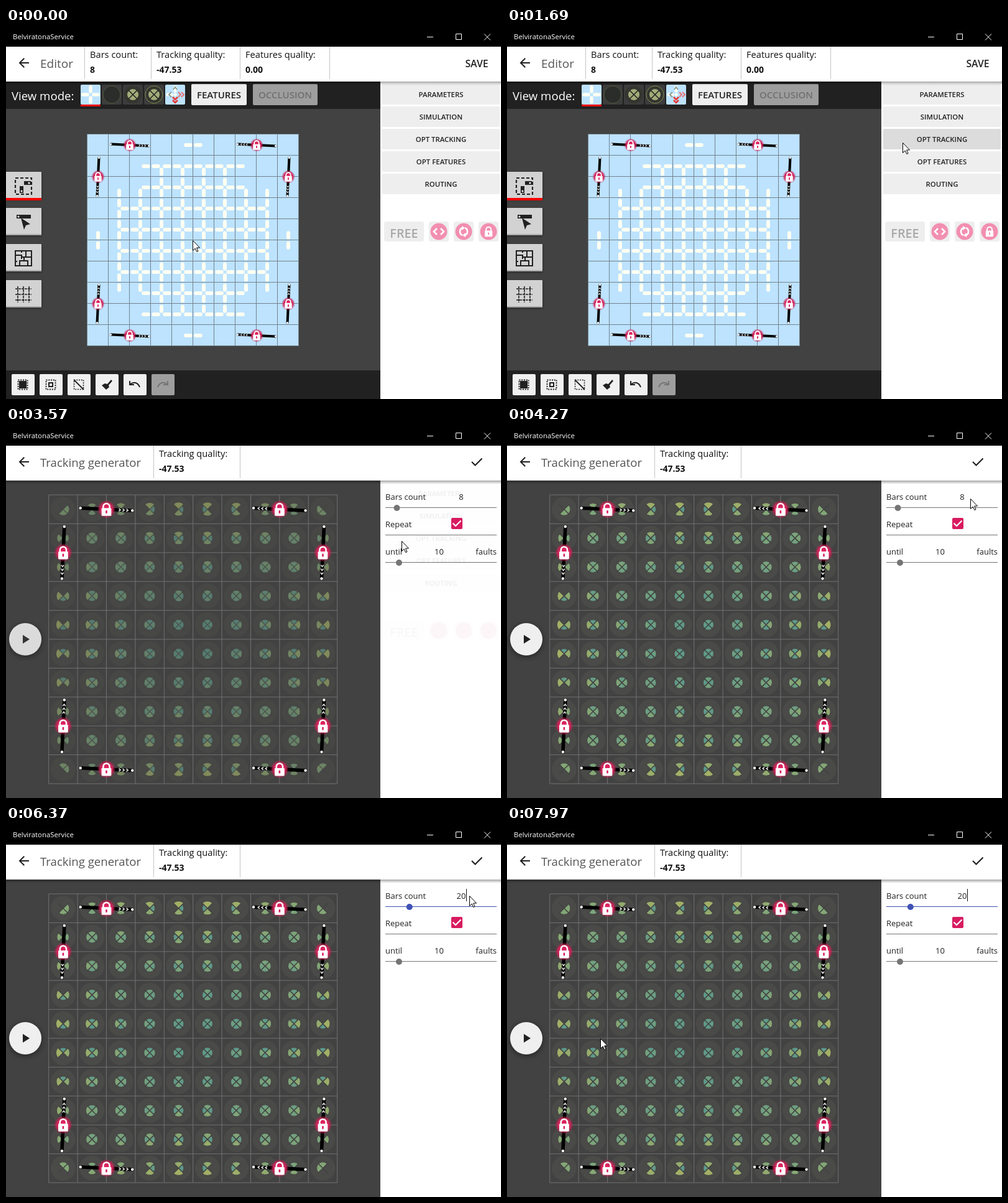
Write an HTML page with a canvas that moves like this. It is 796 px wide and 596 px high and loops after 8 s.

```html
<!DOCTYPE html>
<html lang="en">
<head>
<meta charset="utf-8">
<title>Tracking editor</title>
<style>
html, body { margin: 0; width: 100%; height: 100%; overflow: hidden; background: #424242; }
canvas { display: block; }
</style>
</head>
<body>
<canvas id="stage" width="796" height="596"></canvas>
<script>
const c = document.getElementById('stage').getContext('2d');
const LOOP = 8000, TAU = Math.PI * 2;
const INK = '#212121', SKY = '#bde3ff', IVORY = '#fffff2';

// ---- drawing helpers ----
function rect(x, y, w, h, color, r = 0) {
  c.fillStyle = color;
  c.beginPath();
  c.roundRect(x, y, w, h, r);
  c.fill();
}
function circle(x, y, r, fill, stroke, w = 1) {
  c.beginPath();
  c.arc(x, y, r, 0, TAU);
  if (fill) { c.fillStyle = fill; c.fill(); }
  if (stroke) { c.strokeStyle = stroke; c.lineWidth = w; c.stroke(); }
}
function text(s, x, y, size, color = INK, weight = 400, align = 'left') {
  c.font = `${weight} ${size}px "Open Sans", "Noto Sans", sans-serif`;
  c.fillStyle = color;
  c.textAlign = align;
  c.fillText(s, x, y);
}
function stroke(d, color, w = 1, x = 0, y = 0, dash = []) {
  c.save();
  c.translate(x, y);
  c.setLineDash(dash);
  c.strokeStyle = color;
  c.lineWidth = w;
  c.stroke(new Path2D(d));
  c.restore();
}
function fill(d, color, x = 0, y = 0) {
  c.save();
  c.translate(x, y);
  c.fillStyle = color;
  c.fill(new Path2D(d));
  c.restore();
}
function raised(draw, blur = 4, alpha = .45) {
  c.save();
  c.shadowColor = `rgba(0,0,0,${alpha})`;
  c.shadowBlur = blur;
  c.shadowOffsetY = 2;
  draw();
  c.restore();
}

// ---- shared parts ----
function padlock(x, y, s, hole) {
  c.save();
  c.translate(x, y);
  c.scale(s, s);
  stroke('M-.11 0V-.09A.11 .11 0 0 1 .11-.09V0', '#fff', .055);
  rect(-.17, -.04, .34, .27, '#fff', .03);
  stroke('M0 .04V.14', hole, .055);
  c.restore();
}

// Bars: cell position and direction of the chevrons in quarter turns.
const bars = [[2, .5, 0], [8, .5, 2], [.5, 2, 1], [9.5, 2, 1],
              [.5, 8, 3], [9.5, 8, 3], [2, 9.5, 0], [8, 9.5, 2]];

function drawBars(x0, y0, cell) {
  for (const [i, j, turn] of bars) {
    c.save();
    c.translate(x0 + i * cell, y0 + j * cell);
    c.scale(cell, cell);
    c.save();
    c.rotate(turn * Math.PI / 2 + .047);
    rect(-.95, -.06, 1.9, .12, '#000', .05);
    for (const e of [-.9, .9]) circle(e, 0, .048, '#fff');
    for (let k = 0; k < 3; k++) stroke('M0-.045L.06 0L0 .045', '#ddd', .035, .43 + k * .13, 0);
    c.restore();
    const glow = c.createRadialGradient(0, 0, 0, 0, 0, .32);
    glow.addColorStop(0, '#e91e63');
    glow.addColorStop(.65, '#d0285c');
    glow.addColorStop(1, 'rgba(200,20,75,0)');
    circle(0, 0, .32, glow);
    padlock(0, 0, 1, '#d81b60');
    c.restore();
  }
}
function grid(x0, y0, cell, color) {
  let d = '';
  for (let k = 0; k <= 10; k++) {
    const p = k * cell, n = 10 * cell;
    d += `M${p} 0V${n}M0 ${p}H${n}`;
  }
  stroke(d, color, 1, x0, y0);
}
function header(title, stats) {
  rect(0, 30, 796, 56, '#fff');
  stroke('M8 0H-7M.3-7.3L-7 0L.3 7.3', INK, 2, 29, 56);
  text(title, 55, 64, title === 'Editor' ? 19 : 18.6, '#555');
  for (const [label, value, x] of stats) {
    text(label, x, 48, 14.65, '#111');
    text(value, x, 72, 14, '#111', 700);
  }
}
function dividers(xs) {
  for (const x of xs) rect(x, 30, 1, 52, '#c4c4c4');
}
function frameChrome() {
  rect(0, 0, 796, 30, '#000');
  text('BelviratonaService', 11, 18, 11.4, '#fff');
  stroke('M677 14.5H687M723.5 9.5h9v9h-9zM769 9.5l10 10M779 9.5l-10 10', '#fff');
  const g = c.createLinearGradient(0, 86, 0, 92);
  g.addColorStop(0, 'rgba(0,0,0,.35)');
  g.addColorStop(1, 'rgba(0,0,0,0)');
  rect(0, 86, 796, 6, g);
}

// ---- editor view ----
function arms(x, y, dx, dy) {
  const d = `M${dx * 5.2} ${dy * 5.2}L${dx * 12.6} ${dy * 12.6}`;
  stroke(d, IVORY, 6, x, y);
}
function features() {
  const first = [4, 2, 2, 1, 1, 1, 1, 2, 2, 4];
  c.lineCap = 'round';
  for (let r = 0; r < 10; r++)
    for (let k = first[r]; k < 9 - first[r]; k++) {
      const a = 148 + k * 34, b = 188 + r * 34;
      arms(a, b, 1, 0);
      arms(a + 34, b, -1, 0);
      const p = 148 + r * 34, q = 188 + k * 34;
      arms(p, q, 0, 1);
      arms(p, q + 34, 0, -1);
    }
  c.lineCap = 'butt';
}
function viewModes() {
  rect(0, 86, 602, 44, INK);
  text('View mode:', 9, 116, 18.6, '#fff');
  for (let k = 0; k < 5; k++) rect(120 + k * 34, 91, 32, 32, k % 4 ? '#3c3c3c' : SKY, 2);
  const cross = 'M0-12V-5M0 12V5M-12 0H-5M12 0H5';
  c.lineCap = 'round';
  stroke(cross, IVORY, 5.5, 136, 107);
  stroke('M0-12V-6M-12 0H-6M0 0h.1', IVORY, 5, 272, 107);
  c.lineCap = 'butt';
  rect(120, 123, 32, 3, '#f00');
  circle(170, 107, 14, '#2b2d2a', '#50583f');
  for (const x of [204, 238]) {
    circle(x, 107, 14, '#34352f', x > 204 ? '#7f8b4f' : null);
    circle(x, 107, 9, '#a2ac79');
    stroke('M-7-7L7 7M7-7L-7 7', INK, 1.5, x, 107);
  }
  stroke('M-4 4L0 8L4 4M-4 9L0 13L4 9', '#e53935', 2.6, 272, 107);
  stroke('M5-4L9 0L5 4M10-4L14 0L10 4', '#e57373', 2, 272, 107);
  stroke('M-6-4L-10 0L-6 4M-3-8L0-12L3-8', '#8a9a90', 2, 272, 107);
  rect(298, 90, 89, 34, '#eee', 2);
  text('FEATURES', 342.5, 113, 15, INK, 600, 'center');
  rect(397, 90, 104, 34, '#9e9e9e', 2);
  text('OCCLUSION', 449, 113, 15, '#707070', 600, 'center');
}
function sideTools() {
  for (let k = 0; k < 4; k++)
    raised(() => rect(-2, 231 + k * 58, 59, 43, '#d2d2d2', 1));
  rect(0, 273, 57, 4, '#f00');
  for (const y of [331, 389, 447]) rect(0, y, 57, 2, '#aaa');
  stroke('M-13-13H13V13H-13Z', INK, 2.2, 28, 254, [5, 3]);
  rect(29, 246, 11, 6, INK);
  rect(22, 254, 6, 11, INK);
  circle(37, 249, 1.5, '#fff');
  circle(25, 262, 1.5, '#fff');
  rect(17, 300, 23, 6, INK);
  circle(20, 303, 1.5, '#fff');
  fill('M-3-7L12 3L5 5L2 12Z', INK, 27, 312);
  stroke('M-13-12H13V12H-13ZM-13-5H-3V1M-3-12V-9M4-12V-2H13M-6 12V4H7V12M1-2V4M-13 5H-10M4-2H-2', INK, 2, 28, 370);
  stroke('M-13-9H13M-13 0H13M-13 9H13M-9-13V13M0-13V13M9-13V13', INK, 1.6, 28, 428, [4, 1]);
}
function bottomTools() {
  rect(0, 550, 602, 46, INK);
  for (let k = 0; k < 6; k++) rect(9 + k * 45, 556, 37, 34, k < 5 ? '#f0f0f0' : '#9e9e9e', 2);
  const box = 'M-7.5-7.5H7.5V7.5H-7.5Z';
  rect(21, 567, 12, 12, INK);
  stroke(box, INK, 2, 27, 573, [2, 1.75]);
  stroke(box, INK, 2, 72, 573, [2, 1.75]);
  stroke('M-3-3H3V3H-3Z', INK, 2, 72, 573);
  stroke(box, INK, 1.6, 117, 573, [2, 1.75]);
  stroke('M-8-8L8 8', INK, 1.8, 117, 573);
  fill('M7-8L9-6L3 1L4 4L-1 8L-8 1L-3-2L1-1Z', INK, 162, 573);
  const undo = 'M-7-1C-2-5 5-4 8 4M-8-6V0H-1';
  stroke(undo, INK, 2, 207, 573);
  c.save();
  c.translate(252, 573);
  c.scale(-1, 1);
  stroke(undo, '#757575', 2);
  c.restore();
}
function editorPanel(cursor) {
  const names = ['PARAMETERS', 'SIMULATION', 'OPT TRACKING', 'OPT FEATURES', 'ROUTING'];
  names.forEach((s, k) => {
    const y = 90 + k * 36;
    const hover = cursor && cursor.x > 604 && cursor.y >= y && cursor.y < y + 34;
    rect(605, y, 189, 33, hover ? '#dcdcdc' : '#eee', 2);
    text(s, 699.5, y + 21, 11.4, INK, 600, 'center');
  });
  rect(608, 311, 64, 32, '#eee', 3);
  text('FREE', 640, 337, 19.8, '#a8a8a8', 600, 'center');
  for (const x of [696, 736, 776]) {
    rect(x - 16, 311, 32, 32, '#eee', 3);
    circle(x, 327, 13.5, '#f28fb0');
  }
  stroke('M-3-5L-8 0L-3 5M3-5L8 0L3 5', '#fff', 2.6, 696, 327);
  stroke('M-2 6A6.5 6.5 0 0 1-2-6M2-6A6.5 6.5 0 0 1 2 6', '#fff', 2.6, 736, 327);
  fill('M-3-9L2-6L-3-2ZM3 9L-2 6L3 2Z', '#fff', 736, 327);
  padlock(776, 327, 36, '#f28fb0');
}
function editor(t, cursor) {
  header('Editor', [['Bars count:', '8', 135], ['Tracking quality:', '-47.53', 242], ['Features quality:', '0.00', 385]]);
  dividers([126, 233, 376, 520]);
  text('SAVE', 757, 62.5, 15.8, INK, 600, 'center');
  viewModes();
  rect(131, 171, 340, 340, SKY);
  grid(130.5, 170.5, 34, '#74828e');
  features();
  drawBars(131, 171, 34);
  sideTools();
  bottomTools();
  editorPanel(cursor);
  if (t >= 1990 && t < 3370) {
    rect(432, 164, 163, 30, '#616161', 3);
    text('Open tracking generator', 513.5, 183.5, 12.5, '#fff', 400, 'center');
  }
}

// ---- generator view ----
function lobes(i, j, x, y) {
  const u = (i - 4.5) / 4.5, v = (j - 4.5) / 4.5;
  const corner = Math.abs(u) === 1 && Math.abs(v) === 1;
  circle(x, y, 20, '#4a4a48');
  for (let k = 0; k < 4; k++) {
    const [along, cross] = k % 2 ? [v, u] : [u, v];
    const outward = along * (k < 2 ? 1 : -1) > 0;
    const onRim = Math.abs(cross) === 1;
    if (onRim && (outward || (!corner && Math.abs(along) > .35))) continue;
    const m = corner ? .5 : Math.abs(along) * (1 - .6 * Math.abs(cross)) * (outward ? 1 : .75);
    const mix = (a, b) => a + (b - a) * Math.min(1, m * 1.15);
    c.fillStyle = `rgb(${mix(90, 162)},${mix(152, 176)},${mix(140, 102)})`;
    c.beginPath();
    c.moveTo(x, y);
    c.arc(x, y, 7.7 + 3.5 * m, (k - .5) * TAU / 4, (k + .5) * TAU / 4);
    c.fill();
  }
  stroke('M-8-8L8 8M8-8L-8 8', '#424442', 1.6, x, y);
}
function slider(y, x, color = '#757575') {
  rect(610, y, 179, 1, color);
  if (x) circle(x, y + 1, 5, color);
}
function generatorPanel(t) {
  const value = t < 5470 ? '8' : t < 5670 ? '' : t < 5870 ? '2' : '20';
  text('Bars count', 610, 117, 13);
  text(value, 732, 117, 13, INK, 400, 'center');
  slider(129, 615 + 1.69 * value, t < 4470 ? '#757575' : '#3f51b5');
  // Times at which the caret goes off and on again.
  const off = [[4770, 4970], [5270, 5470], [6070, 6370], [6670, 6870], [7170, 7370], [7670, 7870]];
  if (t >= 4470 && !off.some(([a, b]) => t >= a && t < b))
    rect(732 + value.length * 4, 101, 1, 20, '#111');
  text('Repeat', 610, 161, 13);
  rect(716, 146, 18, 18, '#d81b60', 2);
  stroke('M718.5 154.5L723 159L731.5 150.5', '#fff', 2.2);
  slider(173);
  text('until', 610, 205, 13);
  text('10', 696.5, 205, 13, INK, 400, 'center');
  text('faults', 789, 205, 13, INK, 400, 'right');
  slider(217, 632);
}
function generator(t) {
  const step = Math.floor((t - 3570) / 100);
  const shown = Math.min(1, .65 + step * .15);
  header('Tracking generator', [['Tracking quality:', '-47.53', 246]]);
  dividers([237, 376]);
  stroke('M749 56L754.5 61.5L765.5 50.5', INK, 2.2);
  const cell = 46.4, x0 = 68.7, y0 = 109;
  c.globalAlpha = shown;
  for (let j = 0; j < 10; j++)
    for (let i = 0; i < 10; i++) lobes(i, j, x0 + (i + .5) * cell, y0 + (j + .5) * cell);
  c.globalAlpha = 1;
  grid(x0, y0, cell, '#707070');
  drawBars(x0, y0, cell);
  c.globalAlpha = Math.min(1, shown + .25);
  raised(() => circle(31, 341, 26, '#efefef'), 10, .5);
  fill('M27 334L38 341L27 348Z', INK);
  c.globalAlpha = 1;
  if (step < 1) {
    c.globalAlpha = .07;
    editorPanel();
    c.globalAlpha = 1;
  }
  generatorPanel(t);
}

// ---- pointer: first step, last step, end point ----
const moves = [[690, 1490, 619, 192], [1590, 1690, 636, 184], [2680, 2680, 636, 183],
               [3670, 4270, 745, 115], [4370, 4370, 745, 112], [6870, 7670, 228, 346], [7770, 7970, 150, 341]];

function pointer(t) {
  let x = 300, y = 341;
  for (const [a, b, ex, ey] of moves) {
    if (t < a) break;
    const k = Math.min(1, (Math.floor((t - a) / 100) + 1) * 100 / (b - a + 100));
    const e = k * k * (3 - 2 * k);
    x += (ex - x) * e;
    y += (ey - y) * e;
  }
  return { x: Math.round(x), y: Math.round(y) };
}
function drawPointer({ x, y }) {
  const d = 'M.5.5V16.5L4.2 13L6.8 18.5L9 17.5L6.6 12H11.5Z';
  fill(d, '#fff', x, y);
  stroke(d, '#000', 1, x, y);
}

function draw(now) {
  const t = now % LOOP, cursor = pointer(t);
  rect(0, 0, 796, 596, '#424242');
  rect(602, 86, 194, 510, '#fff');
  if (t < 3570) editor(t, cursor);
  else generator(t);
  frameChrome();
  drawPointer(cursor);
}
const start = performance.now();
function tick() {
  draw(performance.now() - start);
  requestAnimationFrame(tick);
}
tick();
</script>
</body>
</html>
```
